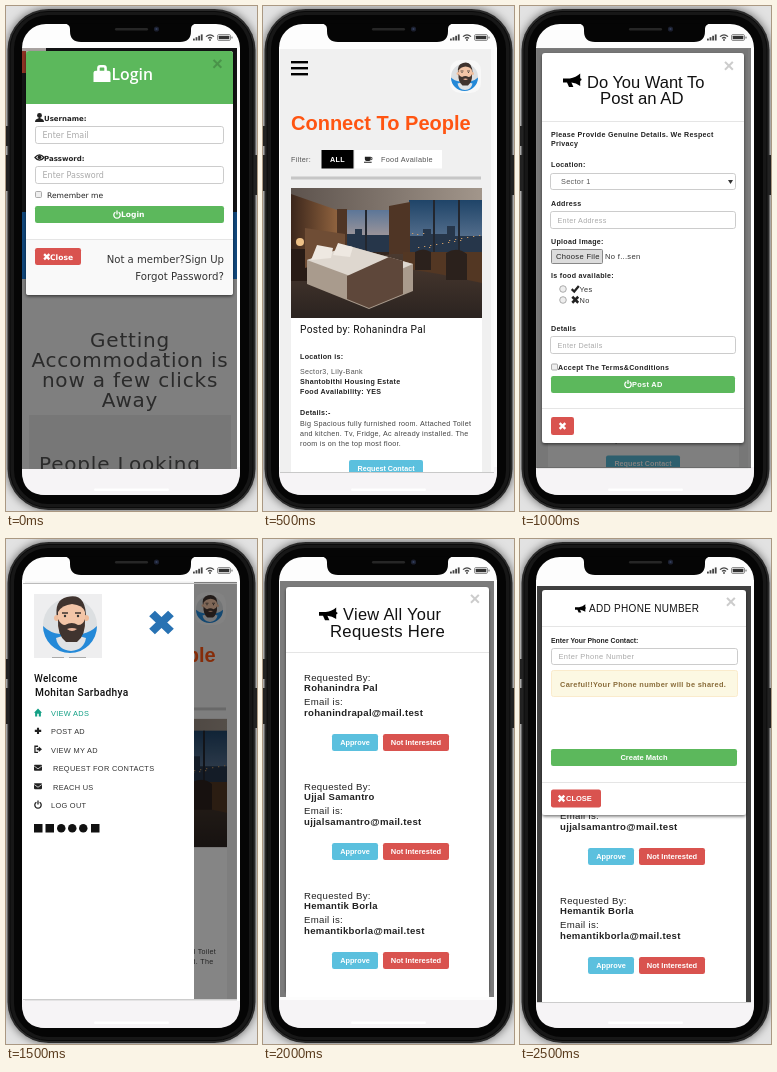
These frames come from a looping animation (251 by 505 pixels, 3 s). An HTML page:

```html
<!DOCTYPE html>
<html lang="en">
<head>
<meta charset="utf-8">
<title>App walkthrough</title>
<style>
html, body { margin: 0; width: 100%; height: 100%; overflow: hidden; background: #e3e3e3; }
svg { display: block; width: 251px; height: 505px; }
text { font-family: "Liberation Sans", Arial, sans-serif; letter-spacing: .3px; white-space: pre; }
.d { font-family: "DejaVu Sans", sans-serif; letter-spacing: 0; }
.r { font-family: Roboto, sans-serif; }
.o { font: 600 15.8px "Open Sans", sans-serif; letter-spacing: 0; }
.w { letter-spacing: .8px; }
.n { letter-spacing: 0; }
.h { font-weight: 500; }
.b { font-weight: 700; }
.m { text-anchor: middle; }
.e { text-anchor: end; }
.scene { visibility: hidden; animation: show 3s step-end infinite; animation-delay: calc(var(--i) * .5s - 3s); }
@keyframes show { 0% { visibility: visible; } 16.6667%, 100% { visibility: hidden; } }
</style>
</head>
<body>
<svg id="stage" viewBox="0 0 251 505" xmlns="http://www.w3.org/2000/svg"></svg>
<script>
const GREEN = '#5cb85c', RED = '#d9534f', CYAN = '#5bc0de', INK = '#222';

const rect = (x, y, w, h, fill, r = 0, extra = '') =>
  `<rect x="${x}" y="${y}" width="${w}" height="${h}" rx="${r}" fill="${fill}" ${extra}/>`;
const path = (d, fill, extra = '') => `<path d="${d}" fill="${fill}" ${extra}/>`;
const circle = (x, y, r, fill, extra = '') => `<circle cx="${x}" cy="${y}" r="${r}" fill="${fill}" ${extra}/>`;
const line = (d, color, w, extra = '') => path(d, 'none', `stroke="${color}" stroke-width="${w}" ${extra}`);
const text = (x, y, size, str, cls = '', fill = INK) =>
  `<text x="${x}" y="${y}" font-size="${size}" class="${cls}" fill="${fill}">${str}</text>`;
const move = (t, body) => `<g transform="${t}">${body}</g>`;

// Icons live in a 10 by 10 box.
const icons = {
  user: c => circle(5, 2.8, 2.7, c) + path('M0 10Q0 6.8 3.6 6L5 4.5L6.4 6Q10 6.8 10 10z', c),
  eye: c => path('M0 5Q5-1 10 5Q5 11 0 5z', 'none', `stroke="${c}" stroke-width="1.4"`) + circle(5, 4.6, 2.1, c),
  power: c => line('M3 2.2A4 4 0 1 0 7 2.2M5 0V5', c, 1.6),
  cross: c => line('M1.5 1.5L8.5 8.5M8.5 1.5L1.5 8.5', c, 3),
  check: c => line('M.8 5.5L3.8 8.3L9.2 1.8', c, 2.6),
  horn: c => path('M0 3.6H3.4Q6.5 3 8.6.4V3.5Q10 4.2 8.6 5.4V8.6Q6.5 6.6 4.2 6.3L5.2 9.4H3L2 6.3H0z', c),
  house: c => path('M5 0L10 5.2H8.6V10H6V6.6H4V10H1.4V5.2H0z', c),
  plus: c => line('M5 1V9M1 5H9', c, 2.6),
  exit: c => line('M5 1.2H1.2V8.8H5', c, 1.6) + path('M3.4 3.8H6V1.6L10 5L6 8.4V6.2H3.4z', c),
  mail: c => rect(0, 1.4, 10, 7.4, c, 1) + line('M.2 3L5 6.4L9.8 3', '#fff', .9),
  cup: c => path('M1 2H8V5Q8 7 6 7H3Q1 7 1 5zM0 8H9V9H0z', c) + line('M8 3H9.4V5.4H8', c, .9),
  bag: c => path('M0 4.5Q0 3.4 1.4 3.4H8.6Q10 3.4 10 4.5V10H0z', c) + line('M2.9 3.6V1.8Q2.9.7 4 .7H6Q7.1.7 7.1 1.8V3.6', c, 1.5)
};
const icon = (name, x, y, w, color = INK, h = w) =>
  move(`translate(${x} ${y}) scale(${w / 10} ${h / 10})`, icons[name](color));

const button = (x, y, w, h, fill, label = '', size = 7) =>
  rect(x, y, w, h, fill, 2.2) + text(x + w / 2, y + h / 2 + 2.6, size, label, 'b m n', '#fff');
const field = (x, y, w, h, hint, cls = '', size = 7.2) =>
  rect(x + .5, y + .5, w - 1, h - 1, '#fff', 2.2, 'stroke="#ccc"') + text(x + 7.5, y + h / 2 + 2.8, size, hint, cls, '#aaa');
const closeX = (x, y, color = '#ccc') => text(x, y + 5.6, 18.5, '×', 'b m n', color);
const rule = (x, y, w, color = '#e5e5e5') => rect(x, y, w, 1, color);
const modal = (x, y, w, h) => rect(x, y, w, h, '#fff', 3, 'filter="url(#shadow)"');
const label = (y, str, x = 31) => text(x, y, 7.1, str, 'b');
const box = (x, y) => rect(x + .5, y + .5, 6, 6, '#eee', 1, 'stroke="#999" stroke-width=".8"');

const avatar = (x, y, s) => move(`translate(${x} ${y}) scale(${s})`,
  circle(0, 0, 27, '#dcdfe1') +
  path('M-27 1Q-20 8 -10 9H12Q21 7 27 1A27 27 0 0 1 -27 1z', '#2489d8') +
  path('M-14 13Q0 7 16 13Q14 25 1 26Q-12 25 -14 13z', '#dfe2e5') +
  path('M-13 -7Q-16 -25 -3 -28Q16 -33 16 -7z', '#40342f') +
  circle(-13, -7, 3, '#eebd9d') + circle(16, -7, 3, '#eebd9d') +
  path('M-12 -13Q-8 -20 2 -21Q13 -20 15 -13V0Q13 14 2 15Q-10 14 -12 0z', '#f3c5a7') +
  path('M-12 -6Q-9 0 -5 0Q2 -4 8 0Q13 0 15 -6Q16 10 7 17H-4Q-13 10 -12 -6z', '#40342f') +
  path('M-3 4Q2 2 7 4Q2 8 -3 4z', '#e9b49a') +
  line('M-8 -12H-2M5 -12H11', '#40342f', 1.6) +
  circle(-5, -9, 1.2, '#333') + circle(8, -9, 1.2, '#333'));

function photo() {
  let lights = '';
  for (let k = 0; k < 18; k++) lights += rect(149 + (k * 37) % 68, 227 + (k * 7) % 15, 1.3, 1, '#c99a68');
  return `<g clip-path="url(#photo)">` +
    rect(28, 182, 191, 130, '#33261f') +
    path('M28 182H219V196L128 205H74L28 190z', 'url(#ceiling)') +
    path('M28 188L74 204V250H28z', 'url(#wall)') +
    rect(74, 204, 54, 42, 'url(#dawn)') + rect(146, 194, 73, 52, 'url(#dusk)') +
    path('M74 228H92V223H99V229H128V246H74zM146 230H160V223H168V228H184V220H192V230H219V246H146z', '#26364a') + lights +
    path('M74 203H84V246H74zM126 200L147 196V256H126z', '#4f3525') +
    line('M103 204V246M171 194V246M196 194V246', '#23272f', 2) +
    path('M28 262L130 248H219V312H28z', 'url(#floor)') +
    path('M140 246H219V277L176 268L140 262z', '#533723') +
    path('M152 246Q160 241 168 246V264H152zM183 247Q194 240 204 248V274H183z', '#2b211c') +
    rect(28, 243, 17, 32, '#281b15') + circle(37, 236, 4, '#eec187') +
    path('M42 222L82 228V250L42 262z', '#6f4d35') +
    path('M44 254L86 240L150 258V285L106 303L44 278z', '#a99b8d') +
    path('M44 254L86 240L150 258L106 277z', '#ded7cf') +
    path('M84 270L126 251L140 255V288L106 302L84 293z', '#5e473a') +
    path('M48 254L54 239L70 242L68 252zM70 249L75 237L90 241L87 251z', '#eee8e1') +
    `</g>`;
}

const listing =
  rect(17, 43, 211, 424, '#f0f0f0') + rect(228, 43, 3, 424, '#fafafa') +
  [55, 61, 67].map(y => rect(28, y, 17, 2.4, '#000')).join('') +
  rect(187, 54, 31, 33, '#f8f8f8', 10) + avatar(201.5, 71, .5) +
  text(28, 124, 20, 'Connect To People', 'b n', '#ff5512') +
  text(28, 156, 7.2, 'Filter:', '', '#555') +
  rect(58.5, 144, 32, 18.5, '#000') + text(74.5, 156, 7.2, 'ALL', 'b m', '#fff') +
  rect(92, 144, 87, 18.5, '#fff') + icon('cup', 101, 149, 8.5) +
  text(118, 156, 7.3, 'Food Available', '', '#555') +
  rect(28, 170.5, 190, 3, '#c6c6c6') +
  rect(28, 182, 191, 284, '#fff') + photo() +
  text(37, 327, 10.2, 'Posted by: Rohanindra Pal', 'r', '#111') +
  label(353, 'Location is:', 37) +
  text(37, 368, 7.1, 'Sector3, Lily-Bank', '', '#555') +
  label(378, 'Shantobithi Housing Estate', 37) +
  label(388, 'Food Availability: YES', 37) +
  label(409, 'Details:-', 37) +
  ['Big Spacious fully furnished room. Attached Toilet',
    'and kitchen. Tv, Fridge, Ac already installed. The',
    'room is on the top most floor.'].map((s, k) => text(37, 420 + 10 * k, 7.15, s, '', '#444')).join('') +
  path('M86 466V456Q86 454 88 454H158Q160 454 160 456V466z', CYAN) +
  text(123, 465, 7.2, 'Request Contact', 'b m n', '#fff') +
  rule(17, 466, 214, '#c9c9c9');

const login =
  rect(16, 42, 215, 421, '#7f7f7f') + rect(16, 42, 215, 164, '#121314') +
  rect(16, 42, 24, 4, '#a9a3a1') + rect(16, 45, 4, 22, '#8d3324') +
  rect(16, 206, 215, 67, '#10467a') +
  ['Getting', 'Accommodation is', 'now a few clicks', 'Away']
    .map((s, k) => text(124, 341 + 20 * k, 20, s, 'd w m', '#2b2b2b')).join('') +
  rect(23, 409, 202, 54, '#777') +
  `<g clip-path="url(#fold)">${text(33, 465, 20, 'People Looking', 'd w', '#2b2b2b')}</g>` +
  modal(20, 45, 207, 244) + path('M20 98V48Q20 45 23 45H224Q227 45 227 48V98z', GREEN) +
  closeX(211.5, 58.5, '#4a934a') + icon('bag', 87.5, 59, 17, '#fff') + text(105.5, 74, 16, 'Login', 'o', '#fff') +
  icon('user', 29, 107, 9) + text(38, 115, 7, 'Username:', 'd b') +
  field(29, 120, 189, 18, 'Enter Email', 'd', 8) +
  icon('eye', 29, 147, 9) + text(38, 155, 7, 'Password:', 'd b') +
  field(29, 160, 189, 18, 'Enter Password', 'd', 8) +
  box(29, 185) + text(41, 192, 7.6, 'Remember me', 'd') +
  button(29, 200, 189, 17, GREEN) + icon('power', 107, 204.5, 8, '#fff') + text(115, 211.3, 7.6, 'Login', 'd b', '#fff') +
  path('M20 233H227V286Q227 289 224 289H23Q20 289 20 286z', '#f9f9f9') + rule(20, 233, 207) +
  button(29, 242, 46, 17, RED) + icon('cross', 37, 247, 7.5, '#fff') + text(44, 253.5, 7.6, 'Close', 'd b', '#fff') +
  text(218, 257, 10.1, 'Not a member?Sign Up', 'd e', '#333') +
  text(218, 274, 10.2, 'Forgot Password?', 'd e', '#333');

const radio = (y, name, str) =>
  circle(43, y, 3.3, '#eee', 'stroke="#999" stroke-width=".8"') +
  icon(name, 51, y - 4.5, 8.5) + text(59.5, y + 3, 7.4, str, '', '#333');

const postAd =
  move('scale(1 .99)', listing) + rect(16, 42, 215, 420, '#000', 0, 'opacity=".5"') +
  modal(22, 47, 202, 390) + closeX(209, 60) +
  icon('horn', 43, 67, 20, '#000', 15) +
  text(67, 82, 16.5, 'Do You Want To', 'n', '#111') + text(80, 98, 16.7, 'Post an AD', 'n', '#111') +
  rule(22, 115, 202) +
  label(131, 'Please Provide Genuine Details. We Respect') + label(140, 'Privacy') +
  label(161, 'Location:') + field(30, 167, 186, 17, '') + text(41, 178, 7.3, 'Sector 1', '', '#555') +
  path('M208 174H213L210.5 178z', '#333') +
  label(200, 'Address') + field(30, 205, 186, 18, 'Enter Address') +
  label(238, 'Upload Image:') +
  rect(31.5, 243.5, 51, 14, '#dcdcdc', 1, 'stroke="#888"') +
  text(36, 253, 7.6, 'Choose File') + text(85, 253, 7.6, 'No f...sen', '', '#333') +
  label(272, 'Is food available:') + radio(283, 'check', 'Yes') + radio(294, 'cross', 'No') +
  label(325, 'Details') + field(30, 330, 186, 18, 'Enter Details') +
  box(31, 357.5) + label(364, 'Accept The Terms&amp;Conditions', 38) +
  button(31, 370, 184, 17, GREEN) + icon('power', 104, 374, 8, '#fff') + text(112, 381, 7.4, 'Post AD', 'b', '#fff') +
  rule(22, 402, 202) +
  button(31, 411, 23, 18, RED) + icon('cross', 38.5, 416, 8, '#fff');

const menu = [
  ['house', 'VIEW ADS', 45], ['plus', 'POST AD', 45], ['exit', 'VIEW MY AD', 45],
  ['mail', 'REQUEST FOR CONTACTS', 47], ['mail', 'REACH US', 47], ['power', 'LOG OUT', 45]
];
const sidebar =
  move('translate(2 0) scale(1 .988)', listing) + rect(188, 43, 43, 418, '#000', 0, 'opacity=".48"') +
  rect(231, 42, 3, 420, '#fff') +
  rect(17, 44, 171, 416, '#fff') + rule(17, 44, 214, '#bbb') +
  rect(28, 55, 68, 64, '#eeeeef') + avatar(64, 86, 1) + line('M46 118.5H58M63 118.5H80', '#aaa', 1) +
  icon('cross', 142, 70.5, 27, '#2872b3', 26) +
  text(28, 143, 10, 'Welcome', 'r h', '#111') + text(29, 157, 10.2, 'Mohitan Sarbadhya', 'r h', '#111') +
  menu.map(([name, str, x], k) => {
    const y = 177 + 18.4 * k, color = k ? INK : '#13a085';
    return icon(name, 28, y - 7.5, 8, color) + text(x, y, 7.4, str, '', k ? '#333' : color);
  }).join('') +
  [28, 39.5, 51, 62, 73, 85].map((x, k) => rect(x, 285, 8.5, 8.5, '#111', k > 1 && k < 5 ? 4.25 : 0)).join('') +
  rule(17, 460, 214, '#ccc');

const people = [
  ['Rohanindra Pal', 'rohanindrapal'], ['Ujjal Samantro', 'ujjalsamantro'], ['Hemantik Borla', 'hemantikborla']
];
const requests = people.map(([name, id], k) => move(`translate(0 ${109 * k})`,
  text(41, 142, 9.6, 'Requested By:') + text(41, 152, 9.5, name, 'b') +
  text(41, 166, 9.6, 'Email is:') + text(41, 177, 9.6, id + '@mail.test', 'b') +
  button(69, 195, 46, 17, CYAN, 'Approve', 7.3) + button(120, 195, 66, 17, RED, 'Not Interested', 7.5))).join('');

const review =
  rect(17, 42, 214, 416, '#7b7b7b') + modal(23, 48, 203, 405) + rect(23, 60, 203, 398, '#fff') +
  closeX(212, 60) + icon('horn', 56, 68, 20, '#000', 14) +
  text(80, 81, 16.4, 'View All Your', '', '#111') + text(67, 98, 16.7, 'Requests Here', '', '#111') +
  rule(23, 113, 203) + requests;

const addPhone =
  rect(17, 47, 214, 416, '#404040') + rect(22, 60, 204, 403, '#fff') +
  move('translate(-1 5)', `<g clip-path="url(#lower)">${requests}</g>`) +
  rule(17, 463, 214, '#ccc') +
  modal(22, 51, 204, 225) + closeX(211, 63) +
  icon('horn', 55, 65, 12, '#000', 9) + text(69, 73, 10, 'ADD PHONE NUMBER', '', '#111') +
  rule(22, 87, 204) +
  text(31, 104, 6.9, 'Enter Your Phone Contact:', 'b n') +
  field(31, 109, 187, 17, 'Enter Phone Number', '', 7.5) +
  rect(31.5, 131.5, 186, 26, '#fcf8e3', 2, 'stroke="#faebcc"') +
  text(40, 148, 7.4, 'Careful!!Your Phone number will be shared.', 'b', '#8a6d3b') +
  button(31, 210, 186, 17, GREEN, 'Create Match', 7.5) +
  rule(22, 243, 204) +
  button(31, 250.5, 50, 18, RED) + icon('cross', 37.5, 255.5, 8, '#fff') + text(46, 262.3, 7.5, 'CLOSE', 'b n', '#fff');

const phone =
  rect(0, 0, 251, 505, '#e2e2e2') +
  rect(1.5, 3, 248, 501, '#2b2b2b', 41, 'filter="url(#halo)"') +
  rect(0, 120, 3, 20, '#222') + rect(0, 149, 3, 36, '#222') + rect(248, 149, 3, 40, '#222') +
  rect(4, 5.5, 243, 496, '#171717', 38, 'stroke="#0a0a0a"') +
  rect(8, 9, 235, 489, '#050505', 34) +
  rect(16, 18, 218, 471, '#fdfdfd', 24) +
  path('M16 461H234V465Q234 489 210 489H40Q16 489 16 465z', '#f6f4f6') +
  rect(88, 482.5, 75, 2.6, '#fff', 1.3) +
  path('M58 17.5Q64 18 64 23V25Q64 36 75 36H174Q185 36 185 25V23Q185 18 191 17.5z', '#050505') +
  rect(109, 22, 33, 2.4, '#262626', 1.2) + circle(150.5, 23, 2.6, '#1c2030') + circle(150.5, 23, 1.1, '#33405e') +
  [0, 1, 2, 3].map(k => rect(187 + 2.6 * k, 32.6 - 1.4 * k, 1.8, 1.9 + 1.4 * k, '#444')).join('') +
  line('M200 30.6Q204 27 208 30.6M202 32.4Q204 30.6 206 32.4', '#444', 1.2) + circle(204, 34, .9, '#444') +
  rect(211.5, 28.5, 13, 6, 'none', 1.5, 'stroke="#777" stroke-width=".8"') +
  rect(212.7, 29.7, 10.6, 3.6, '#333', .6) + rect(225.4, 30.4, 1.2, 2.2, '#777', .5);

const grad = (id, from, to, dir = 'x2="0" y2="1"') =>
  `<linearGradient id="${id}" ${dir}><stop stop-color="${from}"/><stop offset="1" stop-color="${to}"/></linearGradient>`;
const clip = (id, ...r) => `<clipPath id="${id}">${rect(...r, '#000')}</clipPath>`;
const defs = `<defs>
  <filter id="shadow" x="-10%" y="-10%" width="120%" height="120%"><feDropShadow dx="0" dy="1.5" stdDeviation="1.8" flood-opacity=".55"/></filter>
  <filter id="halo" x="-10%" y="-10%" width="120%" height="120%"><feDropShadow dx="0" dy="0" stdDeviation="5" flood-opacity=".6"/></filter>
  ${grad('ceiling', '#5d534d', '#a2968b', '')}${grad('wall', '#3b261b', '#8f623e', '')}
  ${grad('dawn', '#5c7698', '#c3a89a')}${grad('dusk', '#1f4468', '#687e9a')}${grad('floor', '#4b3a30', '#2b2320')}
  ${clip('photo', 28, 182, 191, 130)}${clip('fold', 23, 409, 202, 54)}${clip('lower', 17, 262, 214, 196)}
</defs>`;

document.getElementById('stage').innerHTML = defs + phone +
  [login, listing, postAd, sidebar, review, addPhone]
    .map((body, k) => `<g class="scene" style="--i:${k}">${body}</g>`).join('');
</script>
</body>
</html>
```
